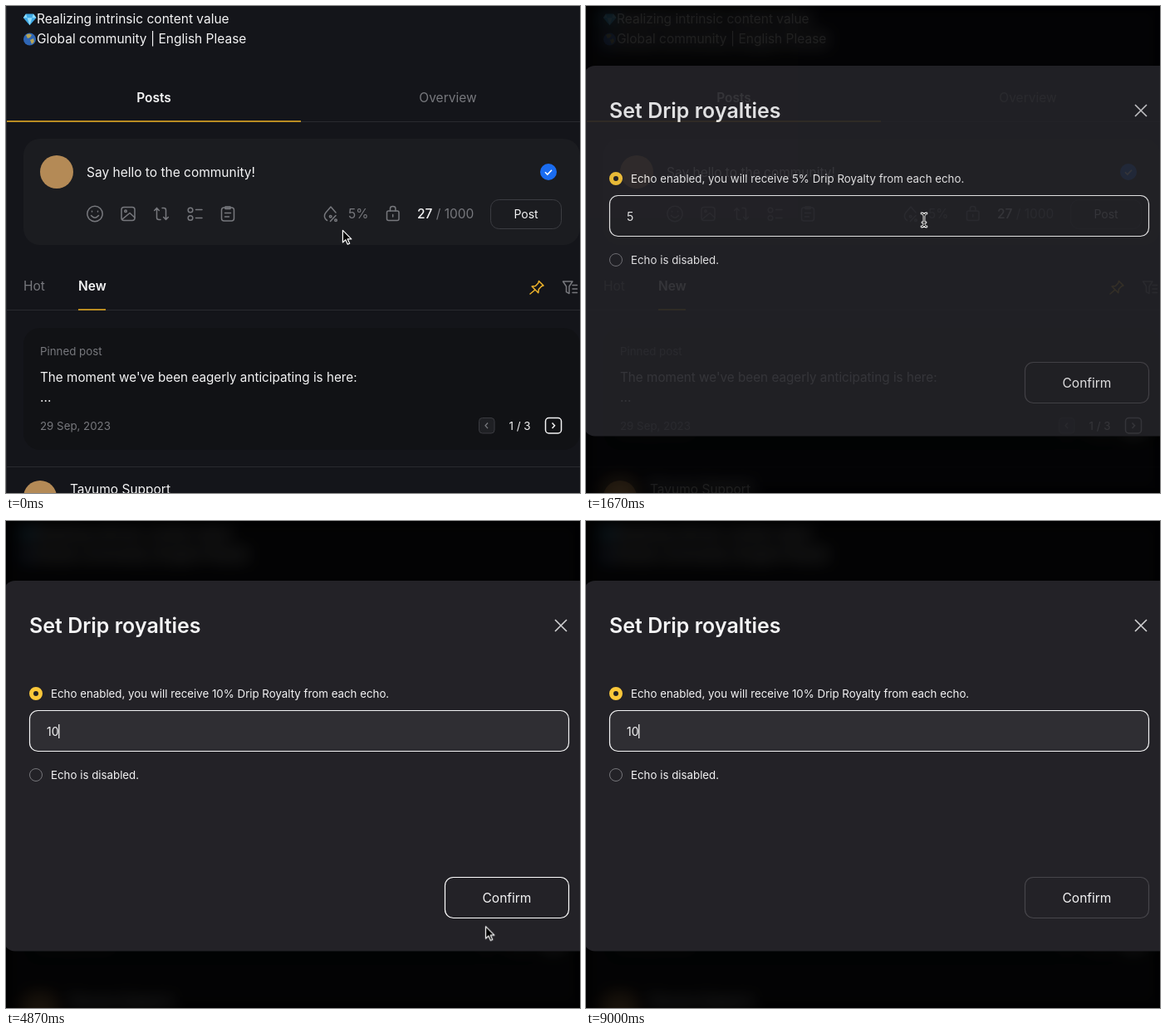
These frames come from a looping animation (691 px wide and 587 px high, 9.07 s). An HTML page:

```html
<!DOCTYPE html>
<html lang="en">
<head>
<meta charset="utf-8">
<title>Set Drip royalties</title>
<style>
  html, body { margin: 0; width: 100%; height: 100%; overflow: hidden; background: #14151a; }
  svg { display: block; width: 691px; height: 587px; }
  text { font: 15.5px Inter, Roboto, sans-serif; fill: #f4f4f5; white-space: pre; }
  .bold { font-weight: 600; }
  .title { font-size: 25px; }
  .lead { font-size: 15.25px; }
  .small { font-size: 13.3px; }
  .value { font-size: 14px; }
  .grey { fill: #77787d; }
  .count { font-weight: 500; fill: #f4f4f5; }
  .mid { text-anchor: middle; }
  .rule { stroke: #292a2f; }
  .mark { stroke: #eeb021; stroke-width: 1.3; }
  .icon { fill: none; stroke: #77787d; stroke-width: 1.5; stroke-linecap: round; stroke-linejoin: round; }
  .icon .gold { stroke: #f0b52b; }

  /* One shared 9.07 s clock; 1% is 90.7 ms */
  .loop { animation: 9.07s linear infinite; }
  .hard { animation: 9.07s step-end infinite; }
  #dialog { animation-name: fade; }
  #field { animation-name: focus; }
  #five { animation-name: five; }
  #one { animation-name: one; }
  #ten { animation-name: ten; }
  #caret { animation-name: blink; }
  #caretPos { animation-name: advance; }
  #confirm { animation-name: hover; }
  #pointer { animation-name: travel; animation-timing-function: ease-in-out; }
  #arrow { animation-name: arrow; }
  #beam { animation-name: beam; }

  @keyframes fade {
    0%, 14.33% { opacity: 0; animation-timing-function: ease; }
    20.6%, 100% { opacity: 1; }
  }
  @keyframes focus {
    0%, 14.6% { fill: #232227; stroke: #47464b; }
    17.6%, 25.6% { fill: #232227; stroke: #f4f4f5; }
    27.4%, 100% { fill: #2f2e33; stroke: #f4f4f5; }
  }
  @keyframes five { 0% { visibility: visible; } 30.87%, 100% { visibility: hidden; } }
  @keyframes one { 0% { visibility: hidden; } 30.87% { visibility: visible; } 33.08%, 100% { visibility: hidden; } }
  @keyframes ten { 0% { visibility: hidden; } 33.08%, 100% { visibility: visible; } }
  @keyframes blink {
    0%, 47.4%, 58.4%, 69.4%, 80.4%, 91.4% { visibility: hidden; }
    25.6%, 52.9%, 63.9%, 74.9%, 85.9%, 96.9%, 100% { visibility: visible; }
  }
  @keyframes advance {
    0% { transform: translateX(-5px); }
    30.87% { transform: translateX(-8px); }
    33.08%, 100% { transform: none; }
  }
  @keyframes hover {
    0%, 48.8% { stroke: #47464b; }
    50.5%, 53.8% { stroke: #fff; }
    55.5%, 57.2% { stroke: #47464b; }
    58.6%, 68.4% { stroke: #fff; }
    70.2%, 100% { stroke: #47464b; }
  }
  @keyframes travel {
    0% { transform: translate(405px, 270px); }
    10.25%, 42.2% { transform: translate(407px, 258px); }
    48.51% { transform: translate(619px, 441px); animation-timing-function: linear; }
    53.69% { transform: translate(577px, 488px); animation-timing-function: ease-out; }
    55.46% { transform: translate(585px, 514px); }
    58.1%, 59.5% { transform: translate(644px, 475px); }
    60.3%, 66.15% { transform: translate(638px, 459px); }
    75%, 75.8% { transform: translate(552px, 196px); animation-timing-function: ease-in; }
    77.18%, 100% { transform: translate(545px, 15px); }
  }
  @keyframes arrow {
    0%, 43% { visibility: visible; }
    14.33%, 77.84%, 100% { visibility: hidden; }
  }
  @keyframes beam {
    0%, 30.1%, 43%, 100% { visibility: hidden; }
    14.33%, 42.2% { visibility: visible; }
  }
</style>
</head>
<body>
<svg viewBox="0 0 691 587">
  <defs>
    <filter id="blur" x="-5%" y="-5%" width="110%" height="110%"><feGaussianBlur stdDeviation="9"/></filter>
    <path id="beamShape" d="M-3-8q3 0 3 2.5V5.5q0 2.5-3 2.5M3-8q-3 0-3 2.5M0 5.5q0 2.5 3 2.5M-2 3H2"/>
  </defs>

  <g id="page">
    <rect width="691" height="587" fill="#14151a"/>
    <path class="rule" d="M.5 0V587M0 139.5H691M0 366.5H691M0 555.5H691"/>

    <path d="M24 9.5h9l3.5 4.8-8 8.9-7.7-8.9z" fill="#3fa9e6"/>
    <path d="M24 9.5l4.5 13.7 4.5-13.7 3.5 4.8H20.8z" fill="#8fdcfa"/>
    <text x="37" y="21">Realizing intrinsic content value</text>
    <circle cx="28.5" cy="40" r="7.5" fill="#2f66b5"/>
    <path d="M24 35q4-3 7 0l-2 3-3 1zM29 41l4-2 1 4-3 3z" fill="#b7a456"/>
    <text x="37" y="45">Global community | English Please</text>

    <text class="bold mid" x="178" y="116">Posts</text>
    <text class="grey mid" x="532" y="116">Overview</text>
    <path class="mark" d="M1 139H355"/>

    <rect x="21" y="160" width="670" height="128" rx="20" fill="#1b1c20"/>
    <circle cx="61" cy="200" r="20" fill="#b48a56"/>
    <text x="97" y="206">Say hello to the community!</text>
    <circle cx="653" cy="200" r="10" fill="#1a6cf0"/>
    <path d="M649 200.3l2.8 2.8 5.2-5.4" fill="none" stroke="#fff" stroke-width="1.6"/>

    <g class="icon">
      <circle cx="107" cy="250.5" r="9.2"/>
      <path d="M103.5 247.3v.6M110.5 247.3v.6M102.5 252.5q4.5 5.4 9 0"/>
      <rect x="139" y="242.5" width="16" height="16" rx="3"/>
      <circle cx="144" cy="247.3" r="1.3"/>
      <path d="M140 257l9-7.5 6 5.5"/>
      <path d="M181.5 243.5v11.5q0 2.5 2.5 2.5h2M178.7 246.5l2.8-3 2.8 3"/>
      <path d="M192.5 257.5V246q0-2.5-2.5-2.5h-2M189.7 254.5l2.8 3 2.8-3"/>
      <circle cx="222" cy="246" r="2.8"/><circle cx="222" cy="255.5" r="2.8"/>
      <path d="M228.5 245.5h7.5M228.5 255.5h7.5"/>
      <rect x="259.5" y="243" width="15" height="16" rx="3"/>
      <path d="M264 242h6v2.5h-6zM263.5 249.5h7M263.5 254h5"/>
      <path d="M386.5 258.5c-3.5-2-4-6.5-1.5-9.5l6-7 6 7"/>
      <path d="M390.5 259.5l6.5-7"/>
      <circle cx="390.7" cy="253.7" r="1.3"/><circle cx="397" cy="258.3" r="1.3"/>
      <rect x="458.5" y="247" width="14.5" height="11.5" rx="2"/>
      <path d="M462.5 247v-3q0-2.5 3.2-2.5t3.2 2.5v3M465.7 251.5v2.5"/>
    </g>
    <text class="grey" x="412" y="256">5%</text>
    <text class="grey" x="495" y="256"><tspan class="count">27</tspan> / 1000</text>
    <rect x="583.5" y="233.5" width="85" height="35" rx="10" fill="none" stroke="#3c3d42"/>
    <text class="mid value" x="626" y="255.5">Post</text>

    <text class="grey" x="21" y="343">Hot</text>
    <text class="bold" x="87" y="343">New</text>
    <path class="mark" d="M87 366H120"/>
    <g class="icon">
      <path class="gold" d="M641.5 331.5l5.5 5.5-2.3.8-3.4 3.6-.5 4.3-7.7-7.7 4.3-.5 3.4-3.6zM637 342l-6 5"/>
      <path d="M670.5 332h11.5l-4 6v8.5l-3.5-1.8V338zM682 336.5h5.5M682 341h5.5M682 345.5h5.5"/>
    </g>

    <rect x="21" y="388" width="670" height="147" rx="20" fill="#111215"/>
    <text class="small grey" x="41" y="420.5">Pinned post</text>
    <text class="lead" x="41" y="453">The moment we've been eagerly anticipating is here:</text>
    <text x="41" y="477">...</text>
    <text class="small grey" x="41" y="510.5">29 Sep, 2023</text>
    <rect x="569.5" y="496.5" width="18.5" height="18.5" rx="4" fill="#1f2024" stroke="#3a3b40"/>
    <path d="M580 502.5l-3 3.3 3 3.3" fill="none" stroke="#77787d" stroke-width="1.3"/>
    <text class="small mid" x="618.5" y="510.5">1 / 3</text>
    <rect x="649.5" y="496.5" width="19" height="18.5" rx="4" fill="none" stroke="#f4f4f5" stroke-width="1.5"/>
    <path d="M657.5 502.5l3 3.3-3 3.3" fill="none" stroke="#f4f4f5" stroke-width="1.5"/>

    <circle cx="41" cy="592" r="20" fill="#b48a56"/>
    <text x="77" y="588">Tavumo Support</text>
  </g>

  <g id="dialog" class="loop">
    <rect width="691" height="587" fill="#000"/>
    <use href="#page" filter="url(#blur)" opacity=".14"/>
    <rect x="-3" y="72" width="720" height="446.5" rx="14" fill="#232227"/>
    <text class="bold title" x="28" y="135">Set Drip royalties</text>
    <path d="M661 119l14 14m0-14l-14 14" stroke="#d2d2d4" stroke-width="1.6"/>

    <circle cx="36" cy="208" r="5.5" fill="#232227" stroke="#fbc83a" stroke-width="5"/>
    <rect id="field" class="loop" x="28.5" y="228.5" width="649" height="49" rx="10" stroke-width="1.2"/>
    <g id="five" class="hard">
      <text class="small" x="54" y="213">Echo enabled, you will receive 5% Drip Royalty from each echo.</text>
      <text class="value" x="49" y="259">5</text>
    </g>
    <g id="one" class="hard">
      <text class="small" x="54" y="213">Echo enabled, you will receive 1% Drip Royalty from each echo.</text>
      <text class="value" x="49" y="259">1</text>
    </g>
    <g id="ten" class="hard">
      <text class="small" x="54" y="213">Echo enabled, you will receive 10% Drip Royalty from each echo.</text>
      <text class="value" x="49" y="259">10</text>
    </g>
    <g id="caretPos" class="hard"><path id="caret" class="hard" d="M63.8 245v17" stroke="#fff" stroke-width="1.2"/></g>

    <circle cx="36" cy="306" r="7.5" fill="none" stroke="#77777b"/>
    <text class="small" x="54" y="311">Echo is disabled.</text>
    <rect id="confirm" class="loop" x="528.5" y="429.5" width="149" height="49" rx="10" fill="none" stroke-width="1.2"/>
    <text class="mid" x="603" y="459.5">Confirm</text>
  </g>

  <g id="pointer" class="loop">
    <path id="arrow" class="hard" d="M.4.4v14.6l3.4-3.2 2.5 5.5 2.4-1.1-2.5-5.3h4.6z" fill="#000" stroke="#fff" stroke-width="1.2" stroke-linejoin="round"/>
    <g id="beam" class="hard" fill="none" stroke-linecap="round">
      <use href="#beamShape" stroke="#fff" stroke-width="2.8"/>
      <use href="#beamShape" stroke="#111"/>
    </g>
  </g>
</svg>
</body>
</html>
```
